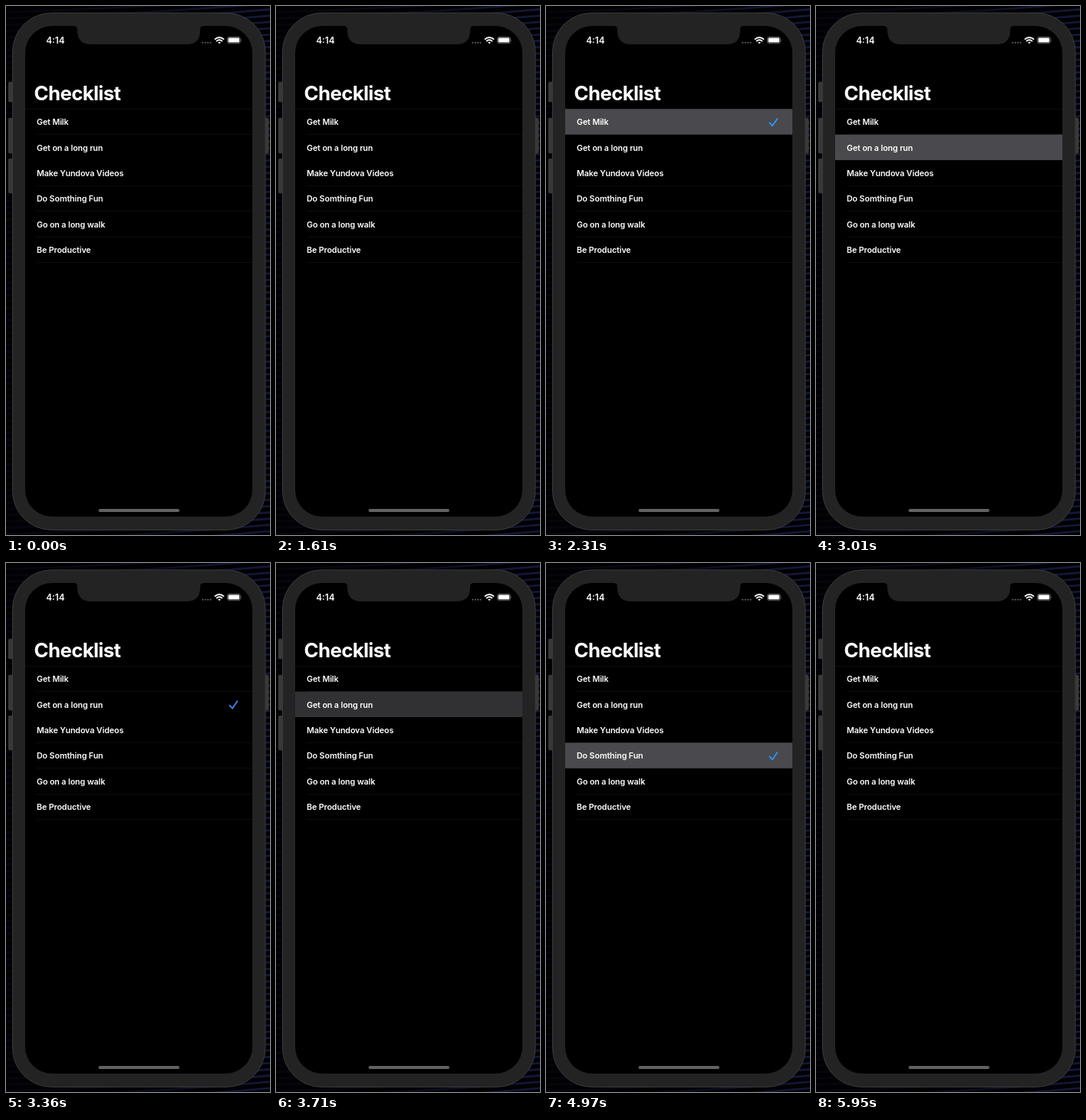
An HTML page that plays this animation: 344 by 690 pixels, repeating every 6.02 s.

```html
<!DOCTYPE html>
<html lang="en">
<head>
<meta charset="utf-8">
<title>Checklist</title>
<style>
  html, body { margin: 0; width: 100%; height: 100%; overflow: hidden; background: #000; }
  svg { display: block; width: 344px; height: 690px; }
  text { font-family: Inter, "Liberation Sans", sans-serif; fill: #fff; }
  .title { font-size: 25.8px; font-weight: 700; letter-spacing: -.65px; }
  .clock { font-size: 11.7px; font-weight: 600; }
  .item { font-size: 10.7px; font-weight: 600; letter-spacing: -.1px; }
  .check { fill: none; stroke-width: 1.8; stroke-linecap: round; stroke-linejoin: round; }
</style>
</head>
<body>
<svg viewBox="0 0 344 690">
  <defs>
    <linearGradient id="glow" gradientUnits="userSpaceOnUse" x1="0" y1="0" x2="344" y2="0">
      <stop offset="0" stop-color="#05050c"/>
      <stop offset=".5" stop-color="#090b18"/>
      <stop offset="1" stop-color="#14183a"/>
    </linearGradient>
    <clipPath id="screen"><rect x="25" y="26" width="296" height="640" rx="35"/></clipPath>
  </defs>

  <rect width="344" height="690" fill="#010104"/>
  <g id="waves" fill="none" stroke="url(#glow)" stroke-width="2.6"/>

  <g fill="#383838" stroke="#4a4a4a" stroke-width=".7">
    <rect x="3.4" y="99.4" width="7" height="25.4" rx="1"/>
    <rect x="3.4" y="146.4" width="7" height="45.4" rx="1"/>
    <rect x="3.4" y="199.4" width="7" height="44.4" rx="1"/>
    <rect x="335" y="146.4" width="7" height="45.4" rx="1"/>
  </g>
  <rect x="8.5" y="9" width="329.5" height="674.5" rx="51" fill="#232323" stroke="#3a3a3a"/>
  <rect x="25" y="26" width="296" height="640" rx="35" fill="#000"/>

  <g id="list" clip-path="url(#screen)"></g>

  <path fill="#232323" d="M88 25H258V26Q253 26 253 31V32Q253 50 235 50H111Q93 50 93 32V31Q93 26 88 26Z"/>
  <text class="clock" x="52.2" y="49">4:14</text>
  <g fill="#5c5c5c">
    <circle cx="256.3" cy="47.8" r="1.1"/><circle cx="259.7" cy="47.8" r="1.1"/>
    <circle cx="263.1" cy="47.8" r="1.1"/><circle cx="266.5" cy="47.8" r="1.1"/>
  </g>
  <g fill="none" stroke="#fff" stroke-width="1.9">
    <path d="M271.9 43.6Q278 38.4 284.1 43.6M274.1 45.9Q278 42.6 281.9 45.9"/>
    <path d="M276.2 47.4Q278 46 279.8 47.4L278 49.3Z" fill="#fff" stroke="none"/>
  </g>
  <rect x="288.4" y="40.4" width="17" height="8.4" rx="2.4" fill="none" stroke="#7a7a7a" stroke-width=".8"/>
  <rect x="289.6" y="41.6" width="14.6" height="6" rx="1.4" fill="#fff"/>
  <path d="M306.2 43.2Q307.4 44.6 306.2 46Z" fill="#7a7a7a"/>
  <text class="title" x="36.6" y="123.1">Checklist</text>
  <rect x="120.5" y="656" width="105.5" height="4" rx="2" fill="#626262"/>
</svg>

<script>
const LOOP = 6020, STEP = 70, TOP = 134.3, ROW = 33.37;
const items = ["Get Milk", "Get on a long run", "Make Yundova Videos",
               "Do Somthing Fun", "Go on a long walk", "Be Productive"];

// Each tap: row, press time, release time, checked after release, sideways nudge
const taps = [
  { row: 0, down: 1680, up: 1750, on: true },
  { row: 0, down: 2310, up: 2380, on: false },
  { row: 1, down: 3010, up: 3080, on: true },
  { row: 1, down: 3570, up: 3640, on: false },
  { row: 3, down: 4270, up: 4340, on: true, nudge: [8, 5, 2, .5] },
  { row: 3, down: 4830, up: 5040, on: false }
];
const fade = [.92, .67, .33, .08];

function add(parent, tag, attrs, label) {
  const el = document.createElementNS("http://www.w3.org/2000/svg", tag);
  for (const key in attrs) el.setAttribute(key, attrs[key]);
  if (label) el.textContent = label;
  return parent.appendChild(el);
}

const waves = document.getElementById("waves");
for (let y = -4; y < 760; y += 8.2) {
  add(waves, "path", { d: `M0 ${y + 12}Q172 ${y + 7} 344 ${y - 8}` });
}

const list = document.getElementById("list");
for (let i = 0; i <= items.length; i++) {
  if (i === 2) continue;
  const x = i ? 40 : 25;
  add(list, "rect", { x, y: Math.round(TOP + i * ROW - .4), width: 321 - x, height: 1, fill: "#0d0d0e" });
}

const rows = items.map((label, i) => {
  const y = TOP + i * ROW;
  const group = add(list, "g", {});
  return {
    group,
    back: add(group, "rect", { x: 25, y, width: 296, height: ROW, fill: "#4a494e", opacity: 0 }),
    text: add(group, "text", { class: "item", x: 40, y: y + 20.9 }, label),
    check: add(group, "path", { class: "check", d: `M291.4 ${y + 18}L295 ${y + 22}L301.4 ${y + 12.6}` })
  };
});

function rowState(row, t) {
  const state = { lit: 0, on: false, x: 0 };
  for (const tap of taps) {
    if (tap.row !== row || t < tap.down) continue;
    const age = Math.round((t - tap.up) / STEP);
    state.lit = age < 0 ? 1 : fade[age] || 0;
    if (age >= 0) state.on = tap.on;
    state.x = tap.nudge ? tap.nudge[Math.round((t - tap.down) / STEP)] || 0 : 0;
  }
  return state;
}

function draw(now) {
  const t = Math.floor((now % LOOP) / STEP) * STEP;
  rows.forEach((r, i) => {
    const s = rowState(i, t);
    r.group.setAttribute("transform", `translate(${s.x} 0)`);
    r.back.setAttribute("opacity", s.lit);
    r.check.setAttribute("stroke", s.lit > .5 ? "#2a97f0" : "#3a87f2");
    r.check.setAttribute("opacity", s.on ? 1 : 0);
  });
}

const start = performance.now();
function tick() {
  draw(performance.now() - start);
  requestAnimationFrame(tick);
}
tick();
</script>
</body>
</html>
```
